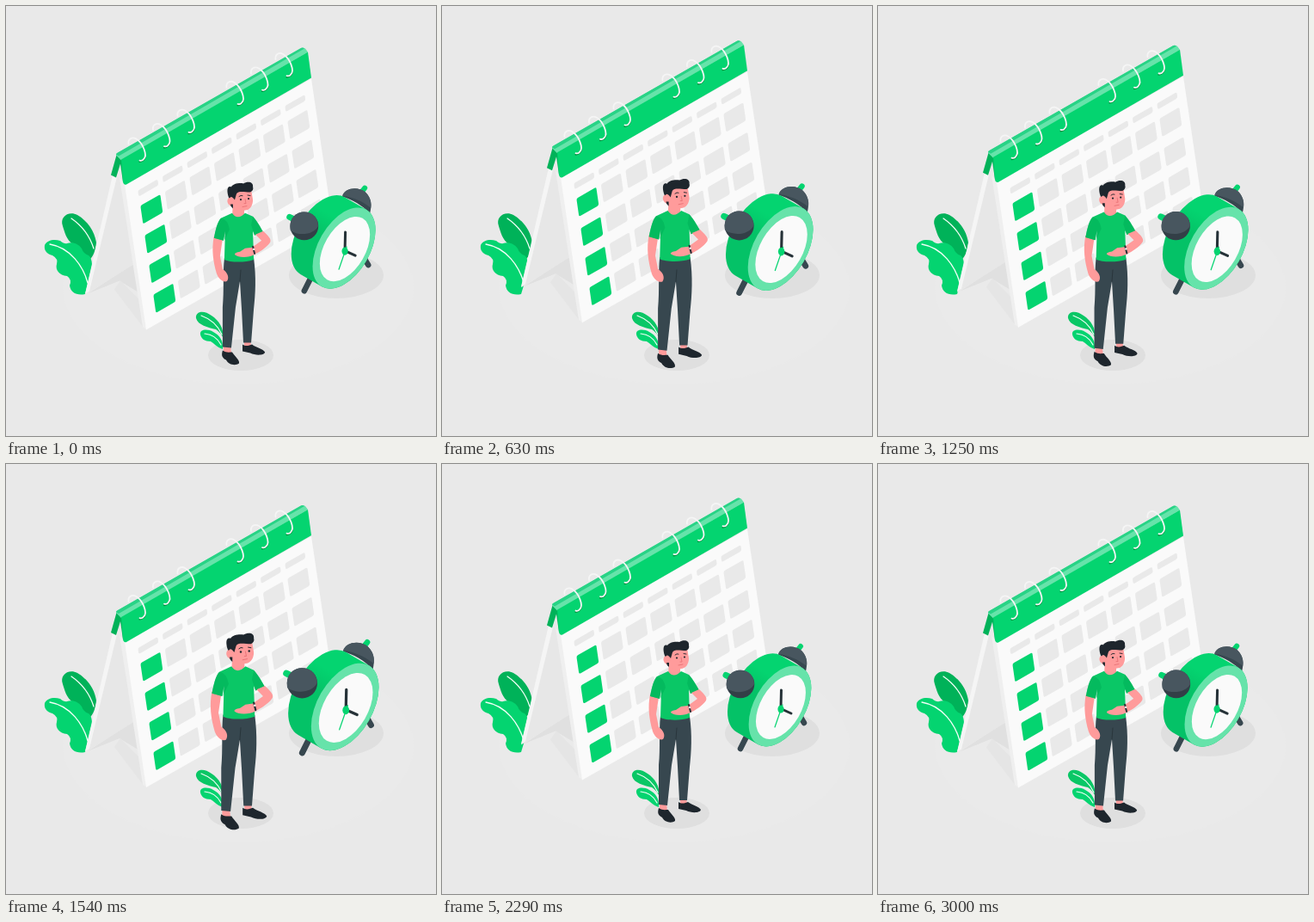
An HTML page that plays this animation: 500 by 500 pixels, repeating every 3040 ms.

```html
<!DOCTYPE html>
<html lang="en">
<head>
<meta charset="utf-8">
<title>Calendar and alarm clock</title>
<style>
  html, body { margin: 0; width: 100%; height: 100%; overflow: hidden; background: #e9e9e9; }
  svg { display: block; width: 100%; height: 100%; }
  .g { fill: #04d470; }
  .shirt { fill: #0ac766; }
  .deep { fill: #00b259; }
  .light { fill: #66e3aa; }
  .skin { fill: #ff9b9b; }
  .ink { fill: #1e262d; }
  .slate { fill: #37474f; }
  .dome { fill: #48565f; }
  .shade { fill: #dfdfdf; }
  .cell { fill: #e9e9e9; }
  .line { fill: none; stroke-linecap: round; stroke-linejoin: round; }
</style>
</head>
<body>
<svg viewBox="0 0 500 500">
  <defs>
    <linearGradient id="case" x1="0" y1="0" x2="0" y2="1">
      <stop offset=".25" stop-color="#04d470"/>
      <stop offset=".5" stop-color="#04c267"/>
    </linearGradient>
  </defs>
  <ellipse cx="270" cy="328" rx="204" ry="112" fill="#eaeaea"/>
  <ellipse class="shade" cx="384" cy="313" rx="55" ry="27"/>
  <ellipse class="shade" cx="273" cy="406" rx="38" ry="18"/>

  <!-- large plant -->
  <path class="deep" d="M66 256C62 245 73 238 83 243C95 250 103 262 105 275C104 285 101 292 97 295L78 277C70 272 68 262 66 256Z"/>
  <path class="g" d="M45 278C48 272 56 271 63 273Q68 277 71 276C77 274 84 276 88 282Q90 288 96 290C101 294 101 305 98 315L92 335C82 337 75 333 74 325Q77 318 71 314C62 313 57 307 59 300Q61 294 54 290C47 288 44 284 45 278Z"/>
  <path class="line" stroke="#f2fff8" stroke-width="1.3" d="M76 247Q95 260 102 282M51 277C75 281 90 303 95 322"/>

  <g id="calendar">
    <path fill="#e0e0e0" d="M95 334L149 299L155 333L132 319Z"/>
    <path fill="#e5e5e5" d="M126 329L133 319L156 342L161 375Z"/>
    <path fill="#e7e7e7" d="M125 196L134 200L150 299L92 335Z"/>
    <path fill="#f5f5f5" d="M124 196L129 198L97 331L92 334Z"/>
    <path fill="#efefef" d="M132 199L139 206L164 376L159 373Z"/>
    <path fill="#fafafa" d="M138 207L355 84L380 253L163 376Z"/>
    <g id="grid"></g>
    <path class="deep" d="M129 171L122 196L128 199L133 183L136 204L138 180Z"/>
    <path class="light" d="M128 173Q128 171 130 170L342 49Q345 47 348 49L351 53L134 179Z"/>
    <path fill="#28d386" d="M128 172Q128 171 130 170L342 49Q345 47 347 49L131 174Z"/>
    <path class="g" d="M134 178L351 53L355 83L140 207Q137 208 136 204Z"/>
    <g id="rings"></g>
  </g>

  <!-- small plant -->
  <path class="shirt" d="M221 363C220 355 230 353 239 360C248 366 253 374 253 387Q250 380 244 376C235 374 223 371 221 363Z"/>
  <path class="g" d="M226 382C225 376 234 375 241 379C249 383 253 390 252 399C245 397 242 392 238 390C231 390 227 387 226 382Z"/>
  <path class="line" stroke="#f2fff8" stroke-width="1.2" d="M227 360Q244 366 251 382M231 381Q244 382 250 394"/>

  <g id="man">
    <path class="skin" d="M253 393H261L262 404H253ZM277 388H284L285 396H277Z"/>
    <path class="ink" d="M252 400C256 403 260 402 263 402C266 407 272 411 271 415C267 418 259 417 256 411C250 408 251 404 252 400Z"/>
    <path class="ink" d="M275 393C279 396 283 394 286 393C291 397 299 398 301 402C300 406 290 406 284 403L275 401Z"/>
    <path class="slate" d="M254 293H288C291 315 290 335 288 352L285 391H276L274 352L272 320L267 350L262 397L252 396V350C254 330 252 310 254 293Z"/>
    <path class="line" stroke="#263238" stroke-width=".8" d="M272 320L273 307"/>
    <path class="skin" d="M242 268L252 271L249 291L252 306C258 310 260 316 257 320C253 322 247 317 245 311C241 297 239 283 242 268Z"/>
    <path class="skin" d="M264 228H277V247H263Z"/>
    <path class="shirt" d="M250 247L263 241Q269 250 278 241L287 245C293 252 296 258 299 263L289 267L287 262L288 295C277 299 260 298 254 295L255 262L253 273L242 270C244 260 246 251 250 247Z"/>
    <path class="deep" opacity=".6" d="M250 247Q258 248 260 260L254 273L255 262L253 273L242 270C244 260 246 251 250 247ZM287 245C293 252 296 258 299 263L289 267L285 255Z"/>
    <path class="skin" d="M290 266L299 262C304 267 309 271 307 275C303 281 295 286 289 289C282 293 270 293 266 289Q266 287 272 286L278 282L286 281L297 273Z"/>
    <path class="line" stroke="#263238" stroke-width="2" d="M287 280L289 288"/>
    <circle cx="288" cy="283" r="1.2" fill="#fafafa"/>
    <path class="skin" d="M265 216L285 214L287 226C287 233 283 238 278 238Q270 240 265 234C260 234 256 229 258 225C260 221 264 222 265 224Z"/>
    <path class="ink" d="M259 223C256 214 258 209 262 211C264 207 272 206 276 207C281 204 288 205 287 211C288 214 286 216 284 217C277 217 270 215 268 219L266 226Q262 220 260 224Z"/>
    <path class="ink" d="M261 231H264V236Q261 234 261 231Z"/>
    <g class="ink"><circle cx="273" cy="225.5" r="1.1"/><circle cx="282" cy="224.5" r="1.1"/></g>
    <path class="line" stroke="#1e262d" stroke-width=".9" d="M271 222Q273 220 275 221M281 220.5L284 221"/>
    <path class="line" stroke="#e56e72" stroke-width=".8" d="M278 225L279 230L277 230M275 234L280 233"/>
  </g>

  <g id="clock">
    <path class="line" stroke="#37474f" stroke-width="6.5" stroke-linecap="butt" d="M355 315L347 331M415 291L421 301"/>
    <path class="line" stroke="#04d470" stroke-width="6" d="M413 217L417 212"/>
    <path class="slate" d="M391 222C394 211 410 210 418 217C425 224 425 233 423 241C414 232 402 225 391 222Z"/>
    <path class="dome" d="M391 221C394 211 410 210 418 217C424 223 425 230 424 235C414 227 402 222 391 221Z"/>
    <g transform="translate(393 281.5) rotate(30)">
      <rect fill="url(#case)" x="-58.2" y="-51.4" width="87.9" height="102.8" rx="29.7" ry="51.4"/>
      <ellipse class="light" rx="29.7" ry="51.4"/>
      <ellipse cx="1.3" cy=".4" rx="23.7" ry="41" fill="#fafafa"/>
    </g>
    <path class="line" stroke="#263238" stroke-width="3" d="M394 284L394.5 263M395 285L406 290"/>
    <path class="line" stroke="#04d470" stroke-width="1.2" d="M396 280L387 306"/>
    <ellipse class="g" cx="394" cy="285" rx="3.6" ry="4.6"/>
    <path class="line" stroke="#04d470" stroke-width="7" d="M330 245.5L337 249"/>
    <circle cx="347" cy="256" r="16.3" fill="#333f47"/>
    <path class="dome" d="M331 261C329 247 337 239.7 347 239.7C357 239.7 363 247 363 256C358 266 341 268 331 261Z"/>
  </g>
</svg>
<script>
const LOOP = 3040, CYCLE = 3000, FLOAT = 1500, LEAD = 15;
const el = id => document.getElementById(id);

// Day grid on the slanted page: a header row and four rows of seven days
const slant = (x, y, h, cls) =>
  `<rect class="${cls}" width="23" height="${h}" rx="2" transform="matrix(1 -.572 .145 1 ${x} ${y})"/>`;
let cells = '', rings = '';
for (let c = 0; c < 7; c++) {
  const x = c * 28.5, y = -c * 16.4;
  cells += slant(153.3 + x, 214 + y, 7, 'cell');
  for (let r = 0; r < 4; r++)
    cells += slant(156.3 + x + r * 5, 231.6 + y + r * 34.5, 21.2, c ? 'cell' : 'g');
  if (c !== 3) rings += `<g transform="translate(${155.5 + x} ${179 + y})">
    <path class="line" stroke="#00913f" stroke-width="2" d="M0 1.5Q5 1 6.5 -4"/>
    <path class="line" stroke="#f5f5f5" stroke-width="1.8" d="M-13 -19C-14 -25 -9 -28 -4 -25C4 -20 9 -6 5 -2Q3 1 0 0"/></g>`;
}
el('grid').innerHTML = cells;
el('rings').innerHTML = rings;

// Two beats per cycle, linear between the turning points
const beat = p => 1 + .1 * Math.max(0,
  Math.min(p / .1, (.3 - p) / .2),
  Math.min((p - .4) / .1, (.6 - p) / .1));

const scaleAt = (id, x, y, s) =>
  el(id).setAttribute('transform', `translate(${x} ${y}) scale(${s}) translate(${-x} ${-y})`);

function draw() {
  const t = (performance.now() % LOOP + LEAD) % CYCLE;
  const f = t % FLOAT / FLOAT;
  el('calendar').setAttribute('transform', `translate(0 ${.8 - 10 * (1 - Math.abs(1 - 2 * f))})`);
  const s = beat(t / CYCLE);
  scaleAt('man', 273, 311, s);
  scaleAt('clock', 379, 270.5, s);
  requestAnimationFrame(draw);
}
draw();
</script>
</body>
</html>
```
